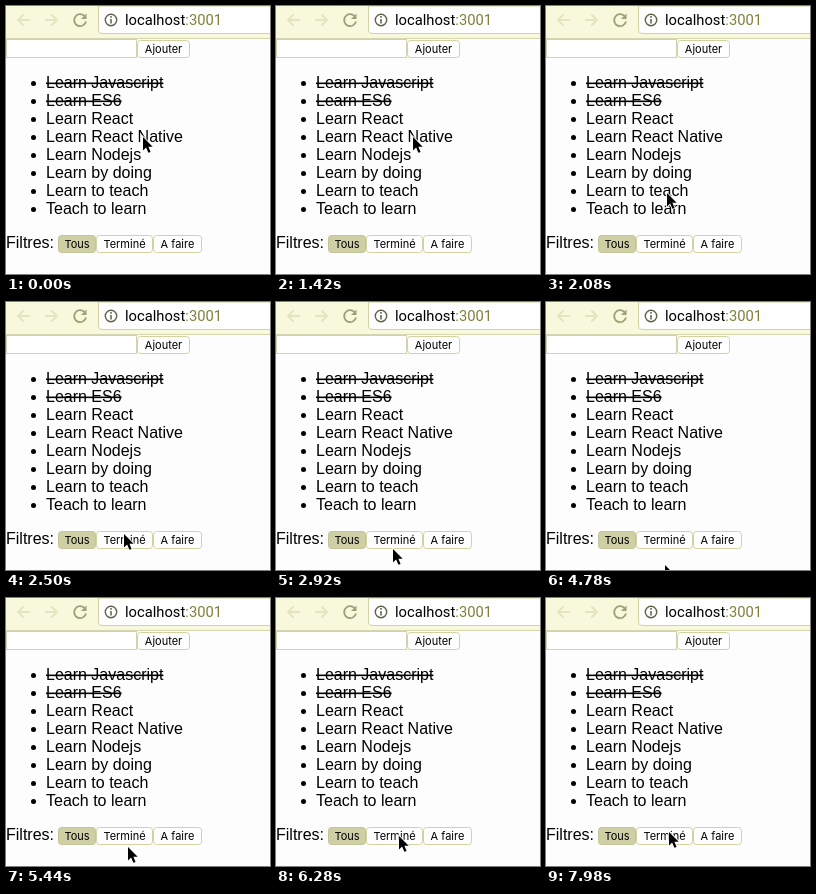
Animation, 264 px wide and 268 px high, one loop 8 s. Source, as an HTML page:

```html
<!DOCTYPE html>
<html lang="fr">
<head>
<meta charset="utf-8">
<title>Todo list</title>
<style>
  html, body { margin: 0; width: 100%; height: 100%; overflow: hidden; background: #fdfdfd; }
  svg { display: block; }
  .page { font: 16px "Liberation Sans", Arial, sans-serif; }
  .button { font: 11px Inter, sans-serif; text-anchor: middle; }
  .button rect { fill: #fefefe; stroke: #d2d2a0; }
  .button.active rect { fill: #cfcfa6; stroke: #c4c498; }
  .url { font: 14.75px Roboto, sans-serif; }
  .icon { fill: none; stroke-width: 1.8; }
</style>
</head>
<body>
<svg width="264" height="268" viewBox="0 0 264 268">
  <rect width="264" height="33" fill="#f8f8dc"/>
  <path d="M0 32.5H264" stroke="#d6d6b0"/>
  <path d="M264 27.5H96Q92.5 27.5 92.5 24V0H264" fill="#fefefe" stroke="#d2d2a4"/>
  <g class="icon">
    <path d="M24 14H12M17.5 8.5L12 14L17.5 19.5M39 14H51M45.5 8.5L51 14L45.5 19.5" stroke="#e4e4be"/>
    <path d="M78.5 10A6 6 0 1 0 80 15.5" stroke="#a0a078"/>
    <circle cx="105" cy="14" r="5.7" stroke="#606048" stroke-width="1.4"/>
    <path d="M105 13V17.5M105 10V11.7" stroke="#606048" stroke-width="1.5"/>
  </g>
  <path d="M80.5 7.5V13H75Z" fill="#a0a078"/>
  <text class="url" x="119" y="19">localhost<tspan fill="#80803a">:3001</tspan></text>
  <rect x="0.5" y="33.5" width="130" height="18" fill="#fefefe" stroke="#d2d2b0"/>
  <g id="page" class="page">
    <text y="242">Filtres:</text>
  </g>
  <path id="cursor" d="M0 0V13.5L3.1 10.6L5.4 15.8L7.6 14.9L5.4 9.8H9.7Z"
        stroke="#fff" stroke-width="1.6" paint-order="stroke"/>
</svg>
<script>
const page = document.getElementById('page');
const cursor = document.getElementById('cursor');
const LOOP = 8000;

function add(parent, tag, attributes, text = '') {
  const node = document.createElementNS('http://www.w3.org/2000/svg', tag);
  for (const name in attributes) node.setAttribute(name, attributes[name]);
  node.textContent = text;
  return parent.appendChild(node);
}

function addButton(label, x, y, width, active) {
  const group = add(page, 'g', { class: active ? 'button active' : 'button' });
  add(group, 'rect', { x: x + 0.5, y: y + 0.5, width: width - 1, height: 17, rx: 3 });
  add(group, 'text', { x: x + width / 2, y: y + 13 }, label);
}

const tasks = ['Learn Javascript', 'Learn ES6', 'Learn React', 'Learn React Native',
  'Learn Nodejs', 'Learn by doing', 'Learn to teach', 'Teach to learn'];
const doneCount = 2;

tasks.forEach((task, i) => {
  const y = 82 + i * 18;
  add(page, 'circle', { cx: 27.5, cy: y - 4.5, r: 2.5 });
  const label = add(page, 'text', { x: 40, y }, task);
  if (i < doneCount) label.style.textDecoration = 'line-through';
});

addButton('Ajouter', 131, 34, 53);
addButton('Tous', 52, 229, 38, true);
addButton('Terminé', 90, 229, 57);
addButton('A faire', 147, 229, 49);

// Pointer stops: time in ms, x, y
const path = [
  [0, 137, 131], [1640, 137, 131], [2080, 121, 187], [2400, 118, 229],
  [2920, 117, 247], [3340, 117, 255], [3760, 117, 266], [4400, 118, 267],
  [4920, 120, 261], [5440, 122, 249], [5860, 123, 247], [6280, 123, 238],
  [6700, 123, 237], [7500, 123, 236], [7980, 123, 234], [LOOP, 123, 234]
];

function draw(now) {
  const t = now % LOOP;
  const next = path.findIndex(stop => stop[0] > t);
  const [t0, x0, y0] = path[next - 1];
  const [t1, x1, y1] = path[next];
  const k = (t - t0) / (t1 - t0);
  const x = Math.round(x0 + (x1 - x0) * k);
  const y = Math.round(y0 + (y1 - y0) * k);
  cursor.setAttribute('transform', `translate(${x} ${y})`);
}

const start = performance.now();
function tick() {
  draw(performance.now() - start);
  requestAnimationFrame(tick);
}
tick();
</script>
</body>
</html>
```
